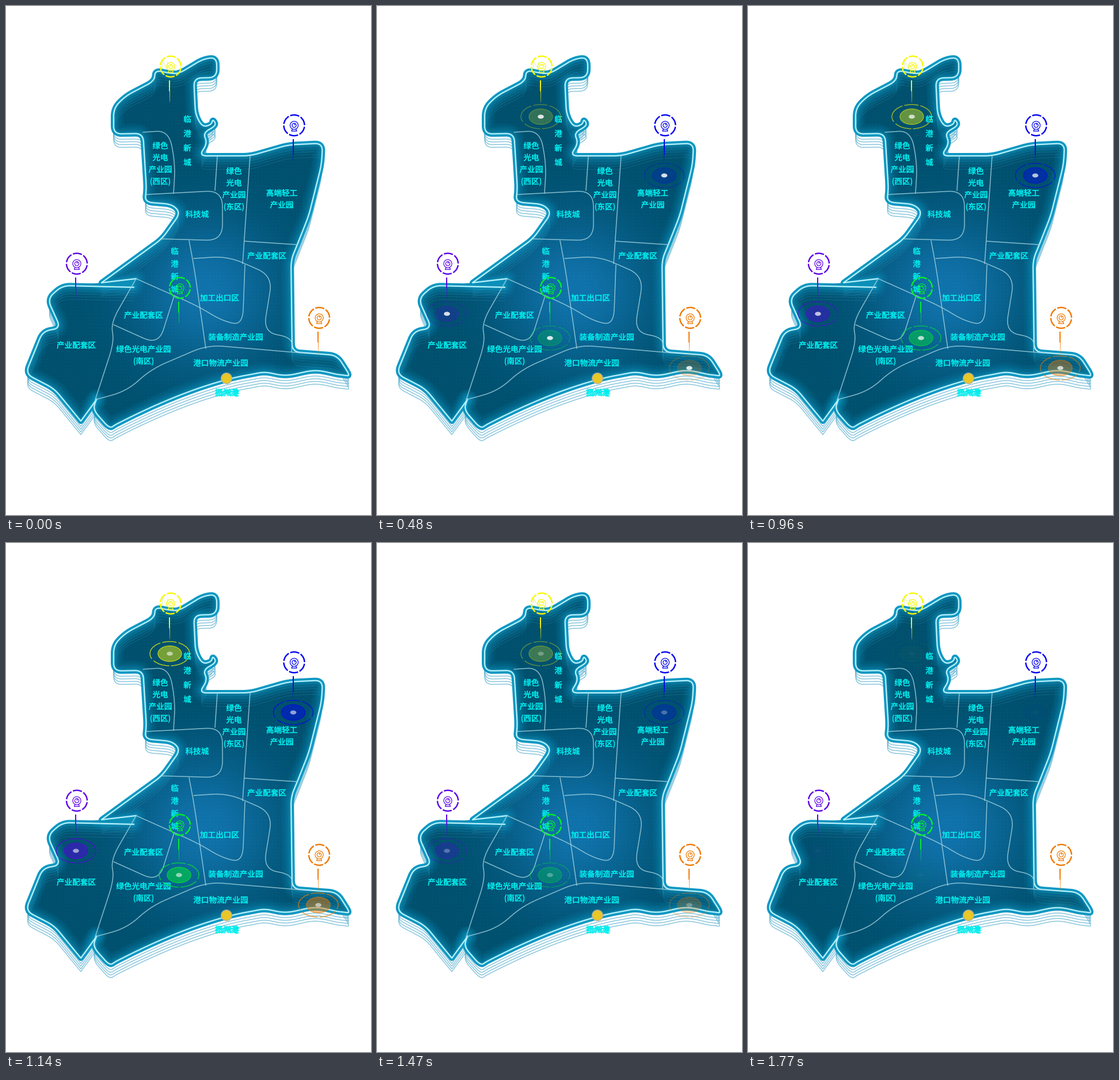
Animation, 634 px wide and 883 px high, one loop 1800 ms. Source, as a matplotlib script:

```python
import numpy as np
import matplotlib.pyplot as plt
from matplotlib.animation import FuncAnimation
from matplotlib.patches import Arc, Circle, Ellipse, PathPatch, Polygon
from matplotlib.path import Path
from matplotlib.patheffects import withStroke

W, H, DPI = 634, 883, 64
FRAMES, STEP = 60, 30
PT = 72 / DPI  # points per pixel
EM = 13.6      # label size in pixels

plt.rcParams["font.family"] = "Noto Sans CJK JP"
fig = plt.figure(figsize=(W / DPI, H / DPI), dpi=DPI, facecolor="white")
ax = fig.add_axes([0, 0, 1, 1])
ax.set_xlim(0, W)
ax.set_ylim(H, 0)
ax.axis("off")


def rounded(points, radius=14):
    """Polyline with each corner replaced by a quadratic curve.

    A doubled point keeps its corner sharp.
    """
    p = np.array(points, float)
    t = np.linspace(0, 1, 9)[:, None]
    out = [p[:1]]
    for a, c, b in zip(p, p[1:], p[2:]):
        ends = []
        for q in (a, b):
            d = np.hypot(*(q - c))
            ends.append(c + (q - c) * min(radius, 0.48 * d) / max(d, 1e-6))
        out.append((1 - t) ** 2 * ends[0] + 2 * t * (1 - t) * c + t ** 2 * ends[1])
    return np.vstack(out + [p[-1:]])


def stroke(p, color, width, alpha=1, z=1, dy=0, clip=None):
    line, = ax.plot(p[:, 0], p[:, 1] + dy, color=color, lw=width * PT, alpha=alpha,
                    zorder=z, solid_joinstyle="round", solid_capstyle="round")
    if clip is not None:
        line.set_clip_path(clip)


def south_shore():
    """Wavy port shore that falls away to the west."""
    x = np.linspace(588, 190, 60)
    wave = 4 * np.cos(2 * np.pi * (x - 485) / 105) * np.clip((x - 430) / 40, 0, 1)
    return list(zip(x, 636.5 + wave + 94 * np.clip((450 - x) / 268, 0, 1) ** 1.5))


# ---- coastline, clockwise
upper = [(226, 473), (166, 480), (166, 480), (271, 404), (303, 359), (289, 344),
         (241, 340), (244, 318), (238, 221), (187, 222), (187, 177), (208, 156),
         (258, 130), (259, 111), (285, 117), (301, 117), (342, 92), (366, 89),
         (366, 124), (326, 125), (329, 188), (341, 210), (357, 206), (359, 196),
         (366, 207), (342, 220), (350, 238), (335, 260), (424, 260), (490, 241),
         (550, 238), (548, 275), (526, 363), (506, 414), (495, 440), (497, 600),
         (575, 606), (598, 642)]
coast = [rounded(upper + south_shore() + [(180, 733), (151, 700), (157, 682)]),
         rounded([(222, 488), (98, 485), (72, 508), (95, 559), (64, 564), (34, 638),
                  (84, 664), (130, 720), (130, 720), (157, 683)])]
land = np.vstack([coast[0], coast[1][::-1]])

# ---- stacked edges below the map
for c in coast:
    for k in range(5, 0, -1):
        stroke(c, "#62b4d2", 1.5, 0.75, 1, dy=4.7 * k)
    stroke(c, "#0f97c2", 10, 1, 2)
ax.add_patch(Polygon([(166, 480), (226, 473), (222, 488), (110, 486)],
                     fc="#0c8fb8", zorder=2))

# ---- land with a soft light in the middle and a fine dot grid
y, x = np.mgrid[0:H, 0:W]
light = np.exp(-((x - 345) ** 2 + (y - 495) ** 2) / 125 ** 2)[..., None]
rgb = np.array([0, 80, 110]) * (1 - light) + np.array([17, 115, 172]) * light
rgb += ((x % 6 == 0) & (y % 6 == 0))[..., None] * np.array([3, 16, 18])
clip = PathPatch(Path(land), transform=ax.transData)
ax.imshow(rgb.astype(np.uint8), extent=(0, W, H, 0), aspect="auto",
          interpolation="nearest", zorder=3).set_clip_path(clip)

for c in coast:
    for k in range(1, 6):
        stroke(c, "#4fb0d0", 1.3, 0.17, 4, dy=4.7 * k, clip=clip)
    for width in range(6, 40, 5):
        stroke(c, "#12aad8", width, 0.9 / width ** 0.8, 4, clip=clip)
    stroke(c, "#7feaff", 3.4, 0.3, 5)
    stroke(c, "#c8f8ff", 1.8, 1, 5)

# ---- district borders
borders = [
    [(238, 219), (283, 216), (294, 275), (291, 325)],
    [(244, 327), (376, 320), (376, 407), (271, 404)],
    [(367, 261), (363, 320)],
    [(424, 260), (417, 360), (411, 447)],
    [(414, 408), (506, 414)],
    [(318, 407), (327, 455), (347, 594)],
    [(326, 438), (385, 434), (463, 468), (447, 566), (497, 575), (496, 600)],
    [(415, 449), (411, 554), (375, 546), (334, 521), (226, 473)],
    [(292, 503), (265, 588), (187, 553)],
    [(155, 683), (210, 668), (252, 630), (350, 588), (515, 602)],
    [(226, 473), (182, 550), (188, 582), (155, 683)],
]
for b in borders:
    stroke(rounded(b, 28), "#9ccfdd", 1.5, 0.85, 5)


# ---- labels
def label(lines, cx, cy, gap=20.6, color="#00eeee"):
    for k, s in enumerate(lines):
        ax.text(cx, cy + k * gap + 0.38 * EM, s, color=color, fontsize=EM * PT,
                ha="center", va="baseline", zorder=7,
                path_effects=[withStroke(linewidth=0.45, foreground=color)])


label("临港新城", 315, 196, 25)
label("临港新城", 293, 425, 22)
label(["绿色", "光电", "产业园", "(西区)"], 268, 242)
label(["绿色", "光电", "产业园", "(东区)"], 396, 286)
label(["高端轻工", "产业园"], 479, 324)
label(["绿色光电产业园", "(南区)"], 239, 595)
label(["科技城"], 332, 361)
label(["加工出口区"], 371, 506)
label(["装备制造产业园"], 399, 574)
label(["港口物流产业园"], 373, 619)
for cx, cy in [(453, 433), (239, 536), (122, 588)]:
    label(["产业配套区"], cx, cy)
for d in (-1, 1):
    label(["扬州港"], 384 + d, 670.5 + d / 2)
ax.add_patch(Circle((383, 646), 9.2, fc="#e8c726", ec="#b5b09a",
                    lw=1.5 * PT, zorder=7))
stroke(np.array([(271, 109), (272, 96), (280, 109), (281, 96)]), "#e6f5c0", 1.3, 1, 7)


# ---- markers
def dashes(cx, cy, w, h, color, width, count, fill, start, z):
    return [ax.add_patch(Arc((cx, cy), w, h, theta1=a, theta2=a + 360 * fill / count,
                             color=color, lw=width * PT, zorder=z))
            for a in start + 360 / count * np.arange(count)]


def pin(cx, cy, color):
    dashes(cx, cy, 36, 36, color, 2.4, 6, 0.85, 8, 9)
    for r in (7, 3.6):
        ax.add_patch(Circle((cx, cy), r, fill=False, ec=color, lw=1.2 * PT, zorder=9))
    for part in [[(0, -4), (0, -1)], [(-3, 6.5), (-4.5, 10), (4.5, 10), (3, 6.5)]]:
        stroke(np.array(part) + (cx, cy), color, 1.3, 1, 9)
    # tapering stem that fades out downwards
    n = 12
    for k in range(n):
        top, w = cy + 24 + 38 * k / n, 1.1 - 0.6 * k / n
        ax.add_patch(plt.Rectangle((cx - 1.7 - w, top), 2 * w, 38 / n, fc=color, lw=0,
                                   alpha=1 - 0.7 * (k / n) ** 2, zorder=8))


def ripple(cx, cy, color):
    rings = dashes(cx, cy, 69, 42, color, 1.4, 5, 0.9, 20, 8)
    rings.append(ax.add_patch(Ellipse((cx, cy), 41, 27, fill=False, ec=color,
                                      lw=1.3 * PT, zorder=8)))
    disc = ax.add_patch(Ellipse((cx, cy), 40, 26, fc=color, lw=0, zorder=8))
    dot = ax.add_patch(Ellipse((cx, cy), 10.5, 7, fc="white", lw=0, zorder=8.5))
    return rings, disc, dot


markers = [(286, 105, "#f8f800"), (500.5, 207, "#0000f0"), (123, 447, "#5a00e6"),
           (302, 489, "#00f02c"), (544, 541, "#f07800")]
ripples = []
for cx, cy, color in markers:
    pin(cx, cy, color)
    ripples.append(ripple(cx - 1.5, cy + 87, color))


def update(i):
    t = i * STEP
    ring = np.interp(t, [0, 1140, 1800], [0, 0.95, 0])
    core = np.interp(t, [0, 540, 660, 1800], [0, 0.95, 0.97, 0])
    for rings, disc, dot in ripples:
        for r in rings:
            r.set_alpha(ring * 0.8)
        disc.set_alpha(ring * 0.5)
        dot.set_alpha(core)
    return []


anim = FuncAnimation(fig, update, frames=FRAMES, interval=STEP, repeat=True,
                     repeat_delay=0, blit=False)
plt.show()
```
